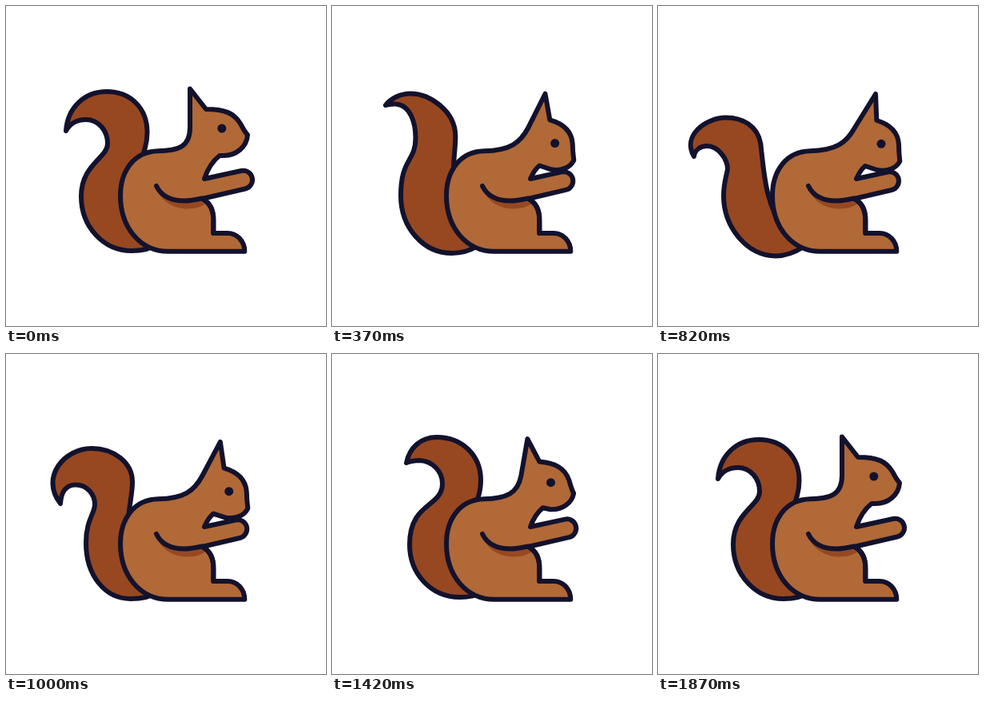
An HTML page for the animation above (1.93 s loop, 400 by 400 pixels).

```html
<!DOCTYPE html>
<html lang="en">
<head>
<meta charset="utf-8">
<title>Squirrel</title>
<style>
  html, body { margin: 0; width: 100%; height: 100%; overflow: hidden; background: #fff; }
  svg { display: block; width: 100%; height: 100%; }
  .line { stroke: #13122d; stroke-width: 6; stroke-linecap: round; stroke-linejoin: round; }
  .fur { fill: #b16937; }
  .dark { fill: #974821; }
  .open { fill: none; }
</style>
</head>
<body>
<svg viewBox="0 0 400 400">
  <path id="tail" class="line dark"/>
  <path id="body" class="line fur"/>
  <path class="dark" d="M188 225C195 245 220 246 240 243L250 247C238 256 205 259 190 233Z"/>
  <path class="line open" d="M188 225C194.5 238.5 208 243.5 223 243.5C231 243.5 238 242 245 240.5C254.5 245.5 259.5 254 259.3 268V284"/>
  <circle id="eye" r="5.5" fill="#13122d"/>
</svg>
<script>
const LOOP = 1930, START = 130, STEP = 30;
const get = id => document.getElementById(id);
const tail = get('tail'), body = get('body'), eye = get('eye');
const lerp = (a, b, m) => a + (b - a) * m;

// Cubic through keys [time, ...values], at rest at both ends
function track(keys, t) {
  const last = keys.length - 1;
  if (t <= keys[0][0]) return keys[0].slice(1);
  if (t >= keys[last][0]) return keys[last].slice(1);
  const i = keys.findIndex(k => k[0] > t) - 1;
  const a = keys[i], b = keys[i + 1], h = b[0] - a[0], u = (t - a[0]) / h;
  const slope = (k, c) => k === 0 || k === last ? 0
    : (keys[k + 1][c] - keys[k - 1][c]) / (keys[k + 1][0] - keys[k - 1][0]);
  const ease = u * u * (3 - 2 * u);
  return a.slice(1).map((v, n) => lerp(v, b[n + 1], ease)
    + h * u * (1 - u) * ((1 - u) * slope(i, n + 1) - u * slope(i + 1, n + 1)));
}

// Tail outlines: right side, top, tip, inner curl, left side, bottom
const nums = s => s.match(/[\d.]+/g).map(Number);
const rest = nums(`165 200C173 183 176.5 172 176.5 158C176.5 128 156 107 126 107
  C98 107 77 127 75 156C80 147 89 142 100 142C115 142 127 155 127 172
  C127 190 94 198 94 238C94 276 122 306 157 306C168 306 180 304 188 298`);
const lifted = nums(`152 215C151 193 154.5 180 154.3 162C153.8 131 122 109.5 98 109.5
  C85 109.5 73 116 67 124C72 123 76 122 80 122.5C98 124 104.5 146 104.5 165
  C104.5 195 86 190 86 237C86 278 115 309 150 309C162 309 172 306 182 300`);
const back = nums(`158 280C132 248 130.5 205 130.3 166C129.8 132 98 116 71 116.5
  C59 117 48 121 41 126C48 125 53 125 58 127C75 133 81 160 82 182
  C82 205 76 212 76 236C76 277 107 313.5 146 313.5C160 313.5 171 309 182 301`);
const drooped = nums(`158 280C134 248 132.5 208 128.3 172C124.5 150 106 139.5 85 139.5
  C60 139.5 29.5 162 45 188C46 180 53 175 61 175C76 175 87 192 87 204
  C85 215 82 222 82 237C82 277 112 312.5 147 312.5C160 312.5 171 308 182 301`);
const curled = nums(`152 215C154 187 158 176 158 160C158 135 134 118 107 118
  C74 118 42 153 68 187C69 171 76 163.5 87 163.5C101 163.5 111 175 111 188
  C111 200 100 207 100 236C100 276 123 306 156 306C168 306 180 304 188 298`);
const forward = nums(`172 205C181 188 186 174 186 158C186 126 162 104 131 104
  C111 104 97 117 93 136C98 134 104 133 110 133C126 134 138 147 138 162
  C138 192 97 185 97 238C97 274 123 304 160 304C170 304 181 302 188 298`);
const settle = rest.map((v, i) => lerp(v, forward[i], -0.1));
const tailKeys = [
  [100, ...rest], [370, ...lifted], [580, ...back], [820, ...drooped],
  [1000, ...curled], [1420, ...forward], [1720, ...settle], [1870, ...rest]
];

// [time, bend toward the paws, ear twitch]
const headKeys = [
  [100, 0, 0], [370, 0.96, 2], [580, 1, 0], [820, 1, 6], [1000, 0.97, 3],
  [1180, 0.75, 0], [1420, 0.4, 0], [1600, -0.3, 0], [1740, 0, 0]
];
const rump = 'M203 306.8C168 306.8 143 277 143 237C143 206 160 182 190 181.3';
const foot = 'L245 241C254.5 245.5 259.5 254 259.3 268V284H277C289 284 298.3 294 298.3 306.8Z';
const upright = `C214 181 230 177 230 152L230 103.5L250 129C274 129 285 134 293 147
  C296 152 298 157 302 161C301 176 288 187 272 187L267 187C258 194 252 204 248 216
  L294 206A11.5 11.5 0 0 1 299 228.5`;
const bent = ear => `C223 180.5 235.5 171 246 152L${266 + ear} 110L273.3 143C288 147.5 300 156 301 173
  C301 180 301.5 187 302.3 194C298 203 286 207.5 274 205L259 200C254 204 251 209 248 216
  L287 207.5A11.5 11.5 0 0 1 292 230`;

function mixPath(a, b, m) {
  const to = nums(b);
  let i = 0;
  return a.replace(/[\d.]+/g, v => lerp(+v, to[i++], m));
}

function draw(now) {
  let t = now % LOOP;
  t = t < START ? 0 : START + STEP * Math.floor((t - START) / STEP);
  const p = track(tailKeys, t);
  tail.setAttribute('d', `M${p.slice(0, 2)}C${p.slice(2)}`);
  const [bend, ear] = track(headKeys, t);
  body.setAttribute('d', rump + mixPath(upright, bent(ear), bend) + foot);
  eye.setAttribute('cx', lerp(269.8, 279, bend));
  eye.setAttribute('cy', lerp(153, 172.3, bend));
}

const begin = performance.now();
function tick() {
  draw(performance.now() - begin);
  requestAnimationFrame(tick);
}
tick();
</script>
</body>
</html>
```
